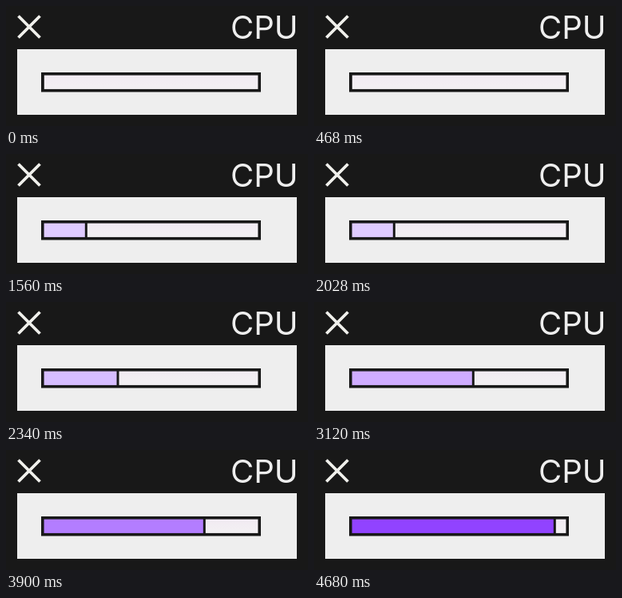
Recreate the animation shown at these times as an HTML page. Size 378x150 px, loop 5460 ms.

```html
<!DOCTYPE html>
<html lang="en">
<head>
<meta charset="utf-8">
<title>CPU meter</title>
<style>
  html, body { margin: 0; width: 100%; height: 100%; overflow: hidden; background: #181818; }
  svg { display: block; width: 378px; height: 150px; }
  text { font: 400 40px Inter, sans-serif; fill: #eeeeee; }
</style>
</head>
<body>
<svg viewBox="0 0 378 150">
  <defs>
    <linearGradient id="sheen" x2="0" y2="1">
      <stop stop-color="#f1eaf2"/>
      <stop offset="1" stop-color="#f3f1f3"/>
    </linearGradient>
  </defs>
  <rect width="378" height="150" fill="#181818"/>
  <path d="M15.5 12.5l27 27m0-27l-27 27" stroke="#f0f0ec" stroke-width="3.8"/>
  <text x="281" y="41">CPU</text>
  <rect x="14" y="54" width="350" height="82" fill="#eeeeee"/>
  <rect x="46" y="85" width="271" height="20.5" fill="url(#sheen)"/>
  <rect id="fill" x="46" y="85" height="20.5"/>
  <path id="divider" stroke="#181818" stroke-width="3"/>
  <rect x="45.8" y="84.8" width="271.4" height="20.9" fill="none" stroke="#181818" stroke-width="3.6"/>
</svg>
<script>
const STEP = 780;
const LEFT = 46;
// Right edge and colour of the filled part at each step
const levels = [
  [LEFT, "none"],
  [61, "#efe9f3"],
  [100.3, "#dfcbff"],
  [140, "#d6bdff"],
  [199.3, "#cfacff"],
  [248.3, "#b37dff"],
  [301.3, "#9143ff"],
];
const fill = document.getElementById("fill");
const divider = document.getElementById("divider");

function draw(now) {
  const [edge, color] = levels[Math.floor(now / STEP) % levels.length];
  fill.setAttribute("width", edge - LEFT);
  fill.setAttribute("fill", color);
  divider.setAttribute("d", `M${edge} 85V105.5`);
  requestAnimationFrame(draw);
}
draw(performance.now());
</script>
</body>
</html>
```
